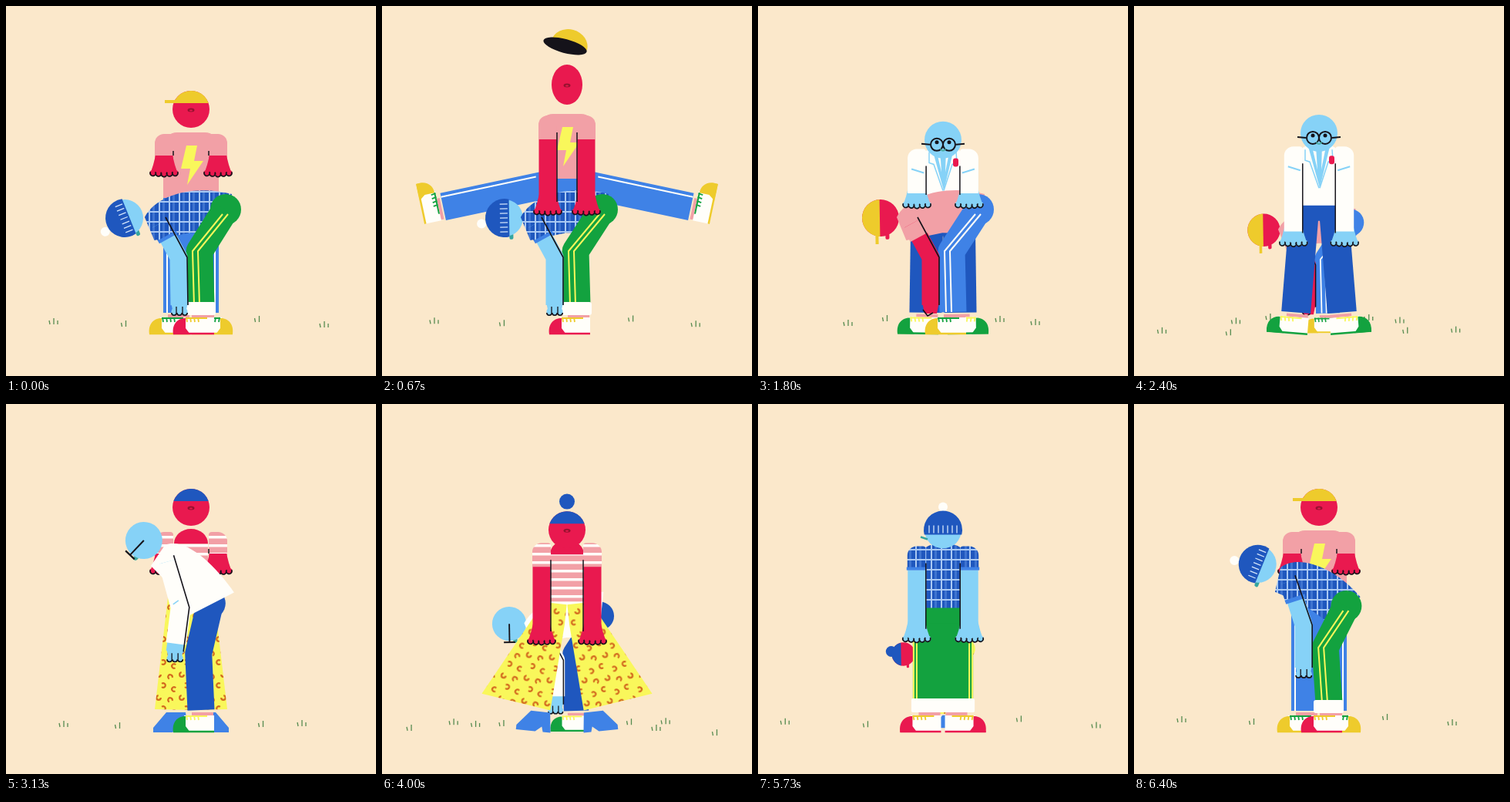
Write an HTML page with a canvas that moves like this. It is 480 px wide and 480 px high and loops after 6470 ms.

```html
<!DOCTYPE html>
<html lang="en">
<head>
<meta charset="utf-8">
<title>Leapfrog</title>
<style>
html, body { margin: 0; width: 100%; height: 100%; overflow: hidden; background: #fbe8cb; }
canvas { display: block; }
</style>
</head>
<body>
<canvas id="stage" width="480" height="480"></canvas>
<script>
const c = document.getElementById('stage').getContext('2d');
const LOOP = 6470, STEPS = 97, TURN = LOOP / 4, TAU = Math.PI * 2;
const RED = '#e9194f', PINK = '#f2a0a6', GOLD = '#eecb2c', LEMON = '#f9f75b', JEANS = '#3f82e6',
  NAVY = '#1f57be', SKY = '#86d2f7', GREEN = '#13a23f', WHITE = '#fffefa', INK = '#15131a';

function fabric(w, h, base, draw) {
  const tile = document.createElement('canvas');
  tile.width = w; tile.height = h;
  const g = tile.getContext('2d');
  g.fillStyle = base;
  g.fillRect(0, 0, w, h);
  draw(g);
  return c.createPattern(tile, 'repeat');
}
const plaid = fabric(13, 13, NAVY, g => {
  g.fillStyle = '#3f74d0';
  g.fillRect(8, 0, 3, 13);
  g.fillStyle = '#a9c8f2';
  g.fillRect(3, 0, 2, 13);
  g.fillRect(0, 6, 13, 2);
});
const stripes = fabric(8, 11, PINK, g => { g.fillStyle = WHITE; g.fillRect(0, 6, 8, 3.5); });
const spots = fabric(30, 30, LEMON, g => {
  g.strokeStyle = '#d2691e';
  g.lineWidth = 2.2;
  [[6, 6, 0], [21, 9, 2], [12, 20, 4], [26, 25, 1]].forEach(([x, y, a]) => {
    g.beginPath(); g.arc(x, y, 2.8, a, a + 4.6); g.stroke();
  });
});

const people = [
  { skin: RED, top: PINK, legs: JEANS, line: WHITE, toe: GOLD, lace: GREEN, width: 72 },
  { skin: SKY, top: WHITE, legs: NAVY, toe: GREEN, lace: LEMON, width: 56, coat: true },
  { skin: RED, top: stripes, legs: spots, width: 44, skirt: true },
  { skin: SKY, top: plaid, legs: GREEN, line: LEMON, toe: RED, lace: GOLD, width: 60, cuff: true }
];

// time, head, shoulder, hip, hand, arm x, leg angle, leg length, flare, hat lift, head stretch
const leap = [
  [60, 134, 166, 255, 216, 35, 0, 143, 0, 0, 0],
  [182, 174, 186, 285, 257, 34, 0, 113, 0, 0, 0],
  [278, 160, 150, 248, 262, 27, 56, 134, .2, 0, 0],
  [382, 122, 128, 222, 262, 26, 82, 146, .3, 0, .4],
  [533, 46, 96, 190, 236, 26, 86, 146, .3, 12, 1],
  [667, 102, 142, 230, 266, 25, 78, 146, .4, 44, 1],
  [765, 163, 180, 262, 307, 33, 6, 136, .9, 30, 0],
  [850, 172, 190, 275, 305, 34, 0, 123, .5, 0, 0],
  [1000, 134, 166, 255, 300, 35, 0, 143, 0, 0, 0]
];
// time, then x y of head, shoulder, hip, knee, elbow, hand, then head turn
const bend = [
  [1400, 240, 134, 238, 172, 246, 260, 246, 322, 234, 235, 232, 290, 0],
  [1512, 182, 172, 212, 200, 263, 258, 250, 325, 228, 260, 219, 318, -43],
  [1548, 161, 205, 202, 228, 275, 262, 248, 316, 220, 285, 220, 340, -66],
  [1617, 154, 275, 200, 282, 285, 264, 251, 318, 224, 326, 225, 388, -112],
  [1790, 159, 275, 200, 282, 286, 264, 251, 318, 224, 326, 224, 388, -91]
];
function pose(keys, t) {
  if (t <= keys[0][0]) return keys[0];
  const i = keys.findIndex(k => k[0] >= t);
  if (i < 0) return keys[keys.length - 1];
  const a = keys[i - 1], b = keys[i], u = (t - a[0]) / (b[0] - a[0]);
  return a.map((v, j) => v + (b[j] - v) * u);
}

function trace(pts) {
  c.beginPath();
  pts.forEach(([x, y]) => c.lineTo(x, y));
}
function poly(fill, ...pts) {
  trace(pts); c.closePath(); c.fillStyle = fill; c.fill();
}
function line(color, width, ...pts) {
  trace(pts); c.strokeStyle = color; c.lineWidth = width; c.stroke();
}
function oval(fill, x, y, rx, ry = rx, from = 0, to = TAU) {
  c.beginPath(); c.ellipse(x, y, rx, ry, 0, from, to); c.fillStyle = fill; c.fill();
}
function ring(color, width, x, y, r, from = 0, to = TAU) {
  c.beginPath(); c.arc(x, y, r, from, to); c.strokeStyle = color; c.lineWidth = width; c.stroke();
}
function box(fill, x, y, w, h, r = 0) {
  c.beginPath(); c.roundRect(x, y, w, h, r); c.fillStyle = fill; c.fill();
}
function at(x, y, angle, draw, flip = 1, scale = 1) {
  c.save();
  c.translate(x, y);
  c.scale(flip * scale, scale);
  c.rotate(angle * Math.PI / 180);
  draw();
  c.restore();
}
// part of a round head above height y
function dome(fill, y, r = 24) {
  const a = Math.asin(y / r);
  oval(fill, 0, 0, r, r, Math.PI - a, TAU + a);
}

function shoe(p) {
  if (p.skirt) {
    poly(JEANS, [-14, -4], [11, -4], [14, 22], [4, 22], [2, 15], [-6, 22], [-31, 22], [-31, 16]);
    return;
  }
  box(PINK, -12, -4, 28, 4);
  box(WHITE, -22, 0, 39, 22);
  c.beginPath();
  c.moveTo(-36, 22);
  c.bezierCurveTo(-38, 8, -30, 1, -20, 1);
  c.lineTo(-20, 14);
  c.lineTo(-14, 22);
  c.fillStyle = p.toe;
  c.fill();
  line(p.toe, 2.5, [-36, 21], [17, 21]);
  line(p.lace, 2, [-20, 1], [8, 1]);
  for (let x = -19; x < -3; x += 5) line(p.lace, 1.8, [x, 0], [x + 1, 6]);
}

function hat(p, lift, side) {
  if (p.cuff) {
    oval(WHITE, side ? -7 : 0, -30 - lift * .3, 6);
    at(0, -lift, 0, () => {
      dome(NAVY, 6, 25);
      for (let x = -18; x <= 18; x += 6) line('#d5e6fb', 1.3, [x, -6], [x, 4]);
    });
  } else if (p.skirt) {
    if (side) oval(NAVY, 6, -25, 11);
    else if (lift) oval(NAVY, 0, -22 - lift * .5, 10);
    dome(side ? NAVY : NAVY, side ? -5 : -8);
  } else if (!p.coat) {
    if (lift > 4) {
      at(-2, -8 - lift, 15, () => {
        oval(GOLD, 5, 0, 24, 21, Math.PI, TAU);
        oval(INK, 0, 2, 29, 9);
      });
    } else {
      at(0, -lift, 0, () => {
        dome(GOLD, side ? -1 : -8);
        line(GOLD, 4, [-34, side ? -5 : -10], [0, side ? -5 : -10]);
      });
    }
  }
}

function frontHead(p, y, lift, stretch) {
  c.save();
  c.translate(240, y);
  oval(p.skin, 0, 0, 24 - 4 * stretch, 24 + 2 * stretch);
  if (p.coat) {
    line(INK, 2, [-28, 5], [-17, 6]);
    line(INK, 2, [17, 6], [28, 5]);
    [-8, 8].forEach(x => { ring(INK, 2, x, 6, 8); oval(INK, x, 3, 2.5); });
    ring('#45a99d', 1.5, 0, 11, 3, 0, Math.PI);
  } else if (p.cuff) {
    line('#35a5a0', 2.5, [-29, 9], [-20, 12]);
  } else {
    oval('#97122f', 0, 1, 4.5, 2.5);
    oval(RED, 0, 1.5, 2, 1);
  }
  hat(p, lift, false);
  c.restore();
}

function frontHand(skin) {
  poly(skin, [-11, -22], [11, -22], [14, -10], [18, 2], [-18, 2], [-14, -10]);
  for (let i = -2; i < 3; i++) {
    const x = i * 7.2, y = 2 - Math.abs(i) * .6;
    oval(skin, x, y, 4.2, 3.8);
    ring(INK, 1.7, x, y, 3.6, -.5, Math.PI + .5);
  }
}

function frontArms(p, k) {
  const [, , sh, , hand, ax] = k;
  const end = p.coat ? hand - 14 : Math.min(sh + 31, hand - 22);
  [1, -1].forEach(flip => at(240, 0, 0, () => {
    line(p.skin, 23, [-ax, sh + 14], [-ax, hand - 12]);
    at(-ax, hand, 0, () => frontHand(p.skin));
    box(p.top, -ax - 12, sh, 24, end - sh, [12, 4, 0, 0]);
    if (p.cuff) box(JEANS, -ax - 13, end - 4, 26, 4);
    if (p.coat) line(SKY, 2, [-ax - 7, sh + 26], [-ax + 9, sh + 31]);
    const bottom = hand > 240 ? hand - 12 : sh + 28;
    line(INK, 1.5, [12 - ax, sh + 22], [12 - ax, bottom]);
  }, flip));
}

function frontBody(p, k) {
  const [, , sh, hip, , , angle, length, flare] = k;
  const w = 36 + Math.max(0, hip - 255) / 5;
  [1, -1].forEach(flip => at(240 - flip * w / 2, hip, angle, () => {
    at(0, length + 6, 0, () => shoe(p));
    if (p.skirt) {
      poly(p.legs, [-12, -4], [18, -4], [18, 22], [18 - 8 * flare, length - 1],
        [-29 - 57 * flare, length - 2 - 13 * flare]);
      return;
    }
    line(p.legs, w, [0, -8], [0, length]);
    if (p.line) {
      [0, 4].slice(p.cuff ? 0 : 1).forEach(x => line(p.line, 2, [x - w / 2 + 1, 20], [x - w / 2 + 1, length]));
    }
    if (p.cuff) box(WHITE, -w / 2 - 2, length - 16, w + 4, 18, 2);
  }, flip));
  if (!p.skirt) box(p.legs, 240 - w / 2, hip - 18, w, 32);
  box(p.top, 240 - p.width / 2, sh - 2, p.width, hip - sh - 4, [18, 18, 0, 0]);
  at(240, sh, 0, () => {
    if (p.skirt) oval(p.skin, 0, 15, 22, 19, Math.PI, TAU);
    if (p.coat) {
      poly(SKY, [-14, 0], [14, 0], [1, 54]);
      poly(WHITE, [-9, 0], [-4, 0], [-2, 30]);
      poly(WHITE, [9, 0], [4, 0], [3, 30]);
      line(SKY, 1.5, [-18, 4], [-18, 18], [-12, 20], [0, 54]);
      line(SKY, 1.5, [17, 4], [18, 18], [12, 20], [1, 54]);
      box(RED, 13, 12, 7, 11, 3);
    }
    if (p.toe === GOLD) poly(LEMON, [-6, 15], [8, 15], [4, 35], [16, 35], [-5, 66], [-1, 45], [-13, 45]);
  });
}

function sideLeg(p, hip, knee) {
  const foot = [253, p.cuff ? 388 : 397];
  at(253, 404, 0, () => shoe(p));
  c.lineJoin = 'round';
  const w = p.skirt ? 39 : 35;
  oval(p.legs, ...hip, 20);
  line(p.legs, w, hip, knee, foot);
  if (p.line) [-9, -2].forEach(x => line(p.line, 2, [hip[0] + x + 5, hip[1] + 6],
    [knee[0] + x, knee[1]], [foot[0] + x, foot[1]]));
  if (p.cuff) box(WHITE, 233, 384, 39, 17, 3);
  c.lineJoin = 'miter';
}

function sideTorso(p, s, hip) {
  const len = Math.hypot(s[0] - hip[0], s[1] - hip[1]);
  const ux = (s[0] - hip[0]) / len, uy = (s[1] - hip[1]) / len;
  const q = (u, v) => [hip[0] + ux * u - uy * v, hip[1] + uy * u + ux * v];
  c.beginPath();
  c.moveTo(...q(-12, p.coat ? 32 : 18));
  c.bezierCurveTo(...q(32, 40), ...q(84, 38), ...q(len + 18, 12));
  [[len + 12, -20], [52, -20], [8, -30]].forEach(([u, v]) => c.lineTo(...q(u, v)));
  c.fillStyle = p.top;
  c.fill();
}

function sideArm(p, s, elbow, hand) {
  const mix = (a, b, u) => [a[0] + (b[0] - a[0]) * u, a[1] + (b[1] - a[1]) * u];
  c.lineJoin = 'round';
  line(p.skin, 23, s, elbow, hand);
  at(...hand, 0, () => {
    poly(p.skin, [-11, -4], [11, -4], [8, 11], [-8, 11]);
    if (p.skin === SKY) {
      [-7, 0, 7].forEach(x => { oval(p.skin, x, 9, 3.6, 5); ring(INK, 1.6, x, 10, 3.2, 0, Math.PI); });
      line(INK, 1.3, [-4, 2], [-4, 10]);
      line(INK, 1.3, [4, 2], [4, 10]);
    } else {
      line(INK, 1.5, [-10, 6], [-4, 14], [3, 10]);
    }
  });
  const edge = ([x, y]) => [x + 11, y];
  if (p.coat) {
    line(p.top, 26, s, elbow, mix(elbow, hand, .82));
    line(SKY, 1.5, [elbow[0] - 10, elbow[1] - 4], [elbow[0] - 3, elbow[1] - 9]);
  } else {
    line(p.top, 27, s, mix(s, elbow, .4));
    if (p.cuff) line(JEANS, 27, mix(s, elbow, .36), mix(s, elbow, .45));
  }
  line(INK, 1.6, [s[0] + 7, s[1] - 8], edge(elbow), edge(hand));
  c.lineJoin = 'miter';
}

function sideHead(p, x, y, turn) {
  at(x, y, turn, () => {
    if (p.coat) oval('#45a99d', -23, 8, 4, 3);
    else box(p.cuff ? '#35a5a0' : p.skin, -28, 6, 8, 5, 2);
    oval(p.skin, 0, 0, 24);
    if (p.coat) {
      line(INK, 2, [0, 0], [-26, 0]);
      line(INK, 2.2, [-26, -8], [-26, 8]);
    }
    hat(p, 0, true);
  });
}

function sideFigure(p, t) {
  const [, hx, hy, sx, sy, px, py, kx, ky, ex, ey, ax, ay, turn] = pose(bend, t);
  const s = [sx, sy], hip = [px, py], leg = () => sideLeg(p, hip, [kx, ky]);
  if (p.coat) leg();
  sideHead(p, hx, hy, turn);
  sideTorso(p, s, hip);
  if (!p.coat) leg();
  sideArm(p, s, [ex, ey], [ax, ay]);
}

const meadow = [
  [[-178, 409, 3], [-87, 412, 2], [86, 406, 2], [173, 413, 3]],
  [[-123, 411, 3], [-75, 405, 2], [74, 406, 3], [120, 410, 3]],
  [[-165, 415, 3], [-95, 417, 2], [91, 415, 2], [144, 414, 3]],
  [[-164, 414, 2], [-95, 410, 3], [93, 414, 3], [154, 419, 2]]
];
function grass(set, scale) {
  set.forEach(([x, y, n]) => at(240 + x * scale, 390 + (y - 390) * scale, 0, () => {
    for (let i = 0; i < n; i++) {
      const bx = (i - (n - 1) / 2) * 5;
      line('#568b50', 1.3, [bx, 4], [bx + (i ? 0 : -1), i % 2 ? -4 : -1]);
    }
  }));
}

function paint(time) {
  const step = Math.floor((time + 8) * STEPS / LOOP) % STEPS;
  const t = step * LOOP / STEPS, n = Math.floor(t / TURN), p = t - n * TURN;
  const jumper = people[n], bent = people[(n + 3) % 4], next = (n + 1) % 4;

  c.fillStyle = '#fbe8cb';
  c.fillRect(0, 0, 480, 480);
  const x = Math.min(1, Math.max(0, (p - 560) / 600)), u = x * x * (3 - 2 * x);
  if (u < .5) grass(meadow[n], 1 - .4 * u);
  if (u > .12) grass(meadow[next], 1 + .34 * (1 - u));

  if (p > 1380) {
    const k = leap[0];
    frontBody(people[next], k);
    frontArms(people[next], k);
    frontHead(people[next], k[1], 0, 0);
    sideFigure(jumper, p);
    return;
  }
  const k = pose(leap, p);
  const back = () => {
    const s = p < 700 ? 1 : .93 - Math.max(0, p - 765) / 400;
    if (s > .35) at(240 * (1 - s), 410 * (1 - s), 0, () => sideFigure(bent, TURN + p), 1, s);
  };
  const arms = () => frontArms(jumper, k);
  if (p > 700) back();
  frontBody(jumper, k);
  if (p < 100) arms();
  if (p <= 700) back();
  if (p >= 100) arms();
  frontHead(jumper, k[1], k[9], k[10]);
}

const start = performance.now();
function tick(now) {
  paint(Math.max(0, now - start) % LOOP);
  requestAnimationFrame(tick);
}
paint(0);
requestAnimationFrame(tick);
</script>
</body>
</html>
```
